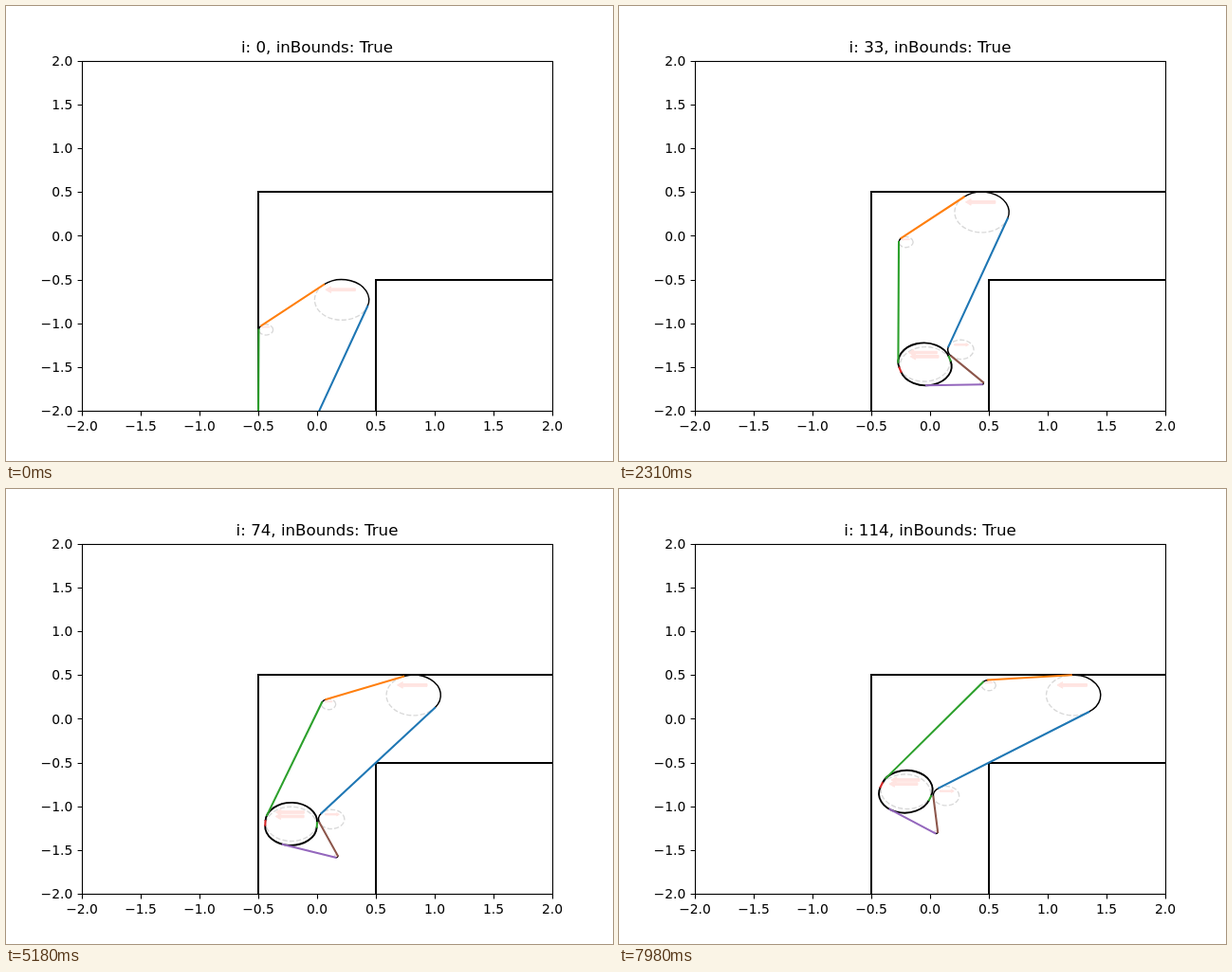
These frames come from a looping animation (640 px wide and 480 px high, 8 s). An HTML page with a canvas:

```html
<!DOCTYPE html>
<html lang="en">
<head>
<meta charset="utf-8">
<title>Shape moving round a corner</title>
<style>
  html, body { margin: 0; width: 100%; height: 100%; overflow: hidden; background: #fff; }
  canvas { display: block; width: 640px; height: 480px; }
</style>
</head>
<body>
<canvas id="stage" width="640" height="480"></canvas>
<script>
const ctx = document.getElementById("stage").getContext("2d");
const LOOP = 8000, STEP = 70;
const SX = 124, SY = 92.4;
const COLORS = {
  blue: "#1f77b4", orange: "#ff7f0e", green: "#2ca02c",
  red: "#d62728", purple: "#9467bd", brown: "#8c564b"
};
const FONT = "'DejaVu Sans', sans-serif";
const THIN = 1.39, THICK = 2.08;

const px = x => 328 + x * SX;
const py = y => 242.4 - y * SY;
const snap = v => Math.floor(v + 0.5) + 0.5;

// Circles relative to the leading one; a negative radius bends inwards.
const BODY = {
  lead: { x: 0, y: 0, r: 0.231 },
  elbow: { x: -0.645, y: -0.341, r: 0.061 },
  upper: { x: -0.491, y: -1.712, r: 0.22 },
  lower: { x: -0.477, y: -1.758, r: 0.22 },
  tip: { x: 0, y: -1.952, r: 0.015 },
  notch: { x: -0.179, y: -1.568, r: -0.11 }
};

// Direction of the common tangent from p to q, with the body on its left.
function heading(p, q) {
  const dx = q.x - p.x, dy = q.y - p.y;
  return Math.atan2(dy, dx) + Math.asin((p.r - q.r) / Math.hypot(dx, dy));
}

const REST = heading(BODY.notch, BODY.lead);

function pose(i) {
  const y = -0.731 + 0.1 * Math.min(i, 10);
  let x = 0.21 + 0.01 * Math.max(0, i - 10);
  let turn = 0;
  if (i > 40) {
    const k = Math.min(1, Math.max(0, (i - 41) / 40));
    x -= 0.031 * Math.sin(k * Math.PI / 2);
    // Turn so that the long side rests on the inner corner.
    const dx = x - 0.5, dy = y + 0.5;
    const lean = Math.atan2(dy, dx) - Math.asin(BODY.lead.r / Math.hypot(dx, dy));
    turn = Math.max(0, REST - lean);
  }
  return { x, y, turn };
}

function place({ x, y, turn }) {
  const c = Math.cos(turn), s = Math.sin(turn), out = {};
  for (const [name, p] of Object.entries(BODY)) {
    out[name] = { x: x + p.x * c + p.y * s, y: y - p.x * s + p.y * c, r: p.r };
  }
  return out;
}

function arc(p, from, to, clockwise = false) {
  const r = Math.abs(p.r);
  ctx.beginPath();
  ctx.ellipse(px(p.x), py(p.y), r * SX, r * SY, 0, -from, -to, !clockwise);
  ctx.stroke();
}

function bend(p, inward, outward) {
  const side = p.r > 0 ? -Math.PI / 2 : Math.PI / 2;
  arc(p, inward + side, outward + side, p.r < 0);
}

function tangent(p, q, color) {
  const u = heading(p, q), nx = Math.sin(u), ny = -Math.cos(u);
  ctx.strokeStyle = color;
  ctx.beginPath();
  ctx.moveTo(px(p.x + p.r * nx), py(p.y + p.r * ny));
  ctx.lineTo(px(q.x + q.r * nx), py(q.y + q.r * ny));
  ctx.stroke();
}

function guide(p) {
  ctx.strokeStyle = "#d9d9d9";
  ctx.lineWidth = THIN;
  ctx.setLineDash([5.14, 2.22]);
  arc(p, 0, Math.PI * 2);
  ctx.setLineDash([]);
}

function arrow(p) {
  const r = Math.abs(p.r), dir = p.r > 0 ? -1 : 1;
  const half = 0.065 * r, head = 0.155 * r;
  const pts = [
    [-0.5, half], [0.4, half], [0.4, head], [0.6, 0],
    [0.4, -head], [0.4, -half], [-0.5, -half]
  ];
  ctx.beginPath();
  for (const [a, b] of pts) ctx.lineTo(px(p.x + dir * a * r), py(p.y + r / 2 + b));
  ctx.closePath();
  ctx.fillStyle = ctx.strokeStyle = "#ffe4e1";
  ctx.lineWidth = 1;
  ctx.fill();
  ctx.stroke();
}

function walls() {
  ctx.strokeStyle = "#000";
  ctx.lineWidth = 2;
  for (const [x, y] of [[266, 196], [390, 289]]) {
    ctx.beginPath();
    ctx.moveTo(x, 430);
    ctx.lineTo(x, y);
    ctx.lineTo(580, y);
    ctx.stroke();
  }
}

function drawShape(c) {
  const { lead, elbow, upper, lower, tip, notch } = c;
  const all = [lead, elbow, upper, lower, tip, notch];
  all.forEach(guide);
  all.forEach(arrow);

  ctx.strokeStyle = "#000";
  ctx.lineWidth = THIN;
  const a = heading(notch, lead), b = heading(lead, elbow), d = heading(elbow, upper);
  const e = heading(lower, tip), f = heading(tip, notch);
  bend(lead, a, b);
  bend(elbow, b, d);
  bend(tip, e, f);
  bend(notch, f, a);

  const axis = heading(upper, lower);
  ctx.lineWidth = 1.9;
  arc(upper, axis + Math.PI / 2, axis + Math.PI * 1.5);
  arc(lower, axis - Math.PI / 2, axis + Math.PI / 2);

  walls();
  ctx.lineWidth = THICK;
  ctx.lineCap = "square";
  tangent(notch, lead, COLORS.blue);
  tangent(lead, elbow, COLORS.orange);
  tangent(elbow, upper, COLORS.green);
  tangent(upper, lower, COLORS.red);
  tangent(lower, upper, COLORS.green);
  tangent(lower, tip, COLORS.purple);
  tangent(tip, notch, COLORS.brown);
  ctx.lineCap = "butt";
}

function drawAxes() {
  ctx.strokeStyle = ctx.fillStyle = "#000";
  ctx.lineWidth = 1.11;
  ctx.strokeRect(80.5, 58.5, 496, 369);
  ctx.font = "13.89px " + FONT;
  for (let v = -2; v <= 2; v += 0.5) {
    const label = (v < 0 ? "\u2212" : "") + Math.abs(v).toFixed(1);
    const x = snap(px(v)), y = snap(py(v));
    ctx.beginPath();
    ctx.moveTo(x, 427.5);
    ctx.lineTo(x, 432.4);
    ctx.moveTo(80.5, y);
    ctx.lineTo(75.6, y);
    ctx.stroke();
    ctx.textAlign = "center";
    ctx.fillText(label, px(v), 447.6);
    ctx.textAlign = "right";
    ctx.fillText(label, 70.3, py(v) + 5.2);
  }
}

function draw() {
  const i = Math.floor((performance.now() % LOOP) / STEP);
  ctx.fillStyle = "#fff";
  ctx.fillRect(0, 0, 640, 480);

  ctx.save();
  ctx.beginPath();
  ctx.rect(80, 58, 496, 369.5);
  ctx.clip();
  drawShape(place(pose(i)));
  ctx.restore();

  drawAxes();
  ctx.font = "16.67px " + FONT;
  ctx.textAlign = "center";
  ctx.fillText(`i: ${i}, inBounds: True`, 328, 49.2);
  requestAnimationFrame(draw);
}
draw();
</script>
</body>
</html>
```
